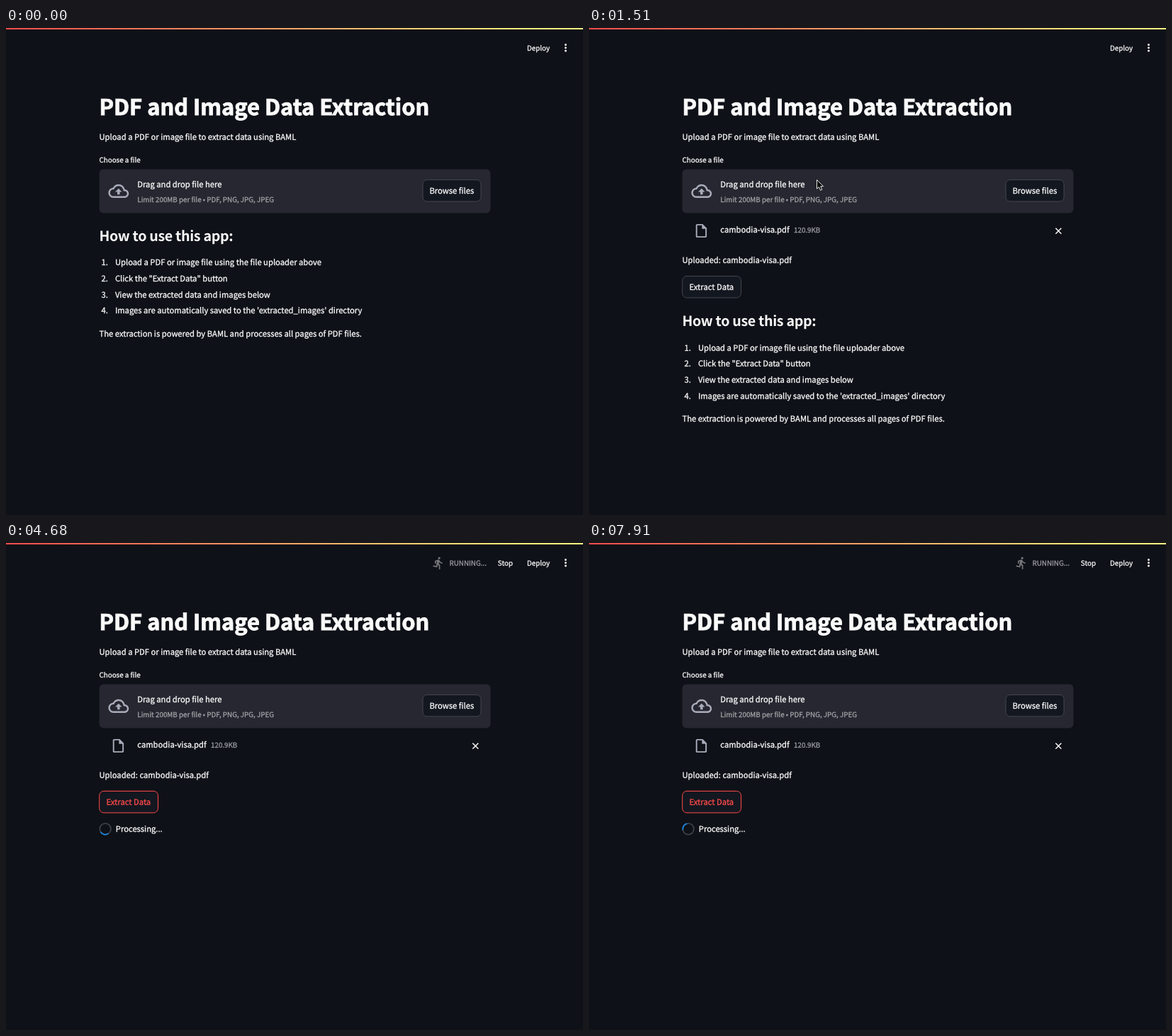
An HTML page with a canvas for the animation above (8000 ms loop, 814 px wide and 688 px high).

```html
<!DOCTYPE html>
<html lang="en">
<head>
<meta charset="utf-8">
<title>PDF and Image Data Extraction</title>
<style>
  html, body { margin: 0; width: 100%; height: 100%; overflow: hidden; background: #0e1117; }
  canvas { display: block; width: 814px; height: 688px; }
</style>
</head>
<body>
<canvas id="stage"></canvas>
<script>
const W = 814, H = 688, LOOP = 8000, START = 630, STEP = 87.74;
const canvas = document.getElementById('stage');
const ctx = canvas.getContext('2d');
const dpr = window.devicePixelRatio || 1;
canvas.width = W * dpr;
canvas.height = H * dpr;

const SANS = '"Noto Sans CJK JP", "Noto Sans CJK SC", "Noto Sans CJK", "Noto Sans", sans-serif';
const BODY = 11.22, SMALL = 9.82;
const WHITE = '#fafafa', GREY = '#9b9da2', RED = '#ff4b4b', BG = '#0e1117';
const FILE = 'cambodia-visa.pdf';

const ICON = {
  cloud: new Path2D('M19.35 10.04C18.67 6.59 15.64 4 12 4 9.11 4 6.6 5.64 5.35 8.04 2.34 8.36 0 10.91 0 14c0 3.31 2.69 6 6 6h13c2.76 0 5-2.24 5-5 0-2.64-2.05-4.78-4.65-4.96zM19 18H6c-2.21 0-4-1.79-4-4 0-2.05 1.53-3.76 3.56-3.97l1.07-.11.5-.95C8.08 7.14 9.94 6 12 6c2.62 0 4.88 1.86 5.39 4.43l.3 1.5 1.53.11c1.56.1 2.78 1.41 2.78 2.96 0 1.65-1.35 3-3 3zM8 13h2.55v3h2.9v-3H16l-4-4z'),
  file: new Path2D('M14 2H6c-1.1 0-2 .9-2 2v16c0 1.1.9 2 2 2h12c1.1 0 2-.9 2-2V8zM6 20V4h7v5h5v11z'),
  stand: new Path2D('M12 2c1.1 0 2 .9 2 2s-.9 2-2 2-2-.9-2-2 .9-2 2-2zm9 7h-6v13h-2v-6h-2v6H9V9H3V7h18z'),
  run: new Path2D('M13.49 5.48c1.1 0 2-.9 2-2s-.9-2-2-2-2 .9-2 2 .9 2 2 2zm-3.6 13.9l1-4.4 2.1 2v6h2v-7.5l-2.1-2 .6-3c1.3 1.5 3.3 2.5 5.5 2.5v-2c-1.9 0-3.5-1-4.3-2.4l-1-1.6c-.4-.6-1-1-1.7-1-.3 0-.5.1-.8.1l-5.2 2.2v4.7h2v-3.4l1.8-.7-1.6 8.1-4.9-1-.4 2z'),
  arrow: new Path2D('M0 0V12.6L2.9 10L5 14.8L7.2 13.8L5.2 9.2H9z'),
  hand: new Path2D('M-1.6 1.2C-1.6-.4 1-.4 1 1.2V5C1.3 4 3.2 4.1 3.4 5.2C3.8 4.5 5.4 4.7 5.6 5.8C6 5.3 7.4 5.5 7.4 6.8V9.3C7.4 11 6.2 11.6 6.2 13.3H-.6C-.8 11.6-2.8 10.4-3.9 8.2C-4.5 6.8-2.9 6-2 7L-1.6 7.6zM.9 8.4V11M2.9 8.4V11M4.9 8.4V11')
};

const lerp = (a, b, p) => a + (b - a) * p;
const clamp = v => Math.min(1, Math.max(0, v));
const smooth = p => p * p * (3 - 2 * p);

function text(str, x, y, { size = BODY, color = WHITE, weight = 400, gap = 0, family = SANS, heft = 0.3 } = {}) {
  ctx.font = `${weight} ${size}px ${family}`;
  ctx.letterSpacing = gap + 'px';
  ctx.fillStyle = ctx.strokeStyle = color;
  ctx.lineWidth = heft;
  ctx.fillText(str, x, y);
  if (heft) ctx.strokeText(str, x, y);
}

function box(x, y, w, h, r, fill, stroke) {
  ctx.beginPath();
  ctx.roundRect(x, y, w, h, r);
  if (fill) { ctx.fillStyle = fill; ctx.fill(); }
  if (stroke) { ctx.strokeStyle = stroke; ctx.lineWidth = 1; ctx.stroke(); }
}

function dot(x, y, r, color) {
  ctx.fillStyle = color;
  ctx.beginPath();
  ctx.arc(x, y, r, 0, 7);
  ctx.fill();
}

function icon(path, x, y, scale, color) {
  ctx.save();
  ctx.translate(x, y);
  ctx.scale(scale, scale);
  ctx.fillStyle = color;
  ctx.fill(path);
  ctx.restore();
}

function pointer(path, x, y) {
  ctx.save();
  ctx.translate(x, y);
  ctx.lineJoin = 'round';
  ctx.lineWidth = 0.9;
  ctx.fillStyle = '#000';
  ctx.strokeStyle = '#fff';
  ctx.fill(path);
  ctx.stroke(path);
  ctx.restore();
}

function header() {
  const g = ctx.createLinearGradient(0, 0, W, 0);
  g.addColorStop(0, '#ff4b4b');
  g.addColorStop(1, '#fffd80');
  ctx.fillStyle = g;
  ctx.fillRect(0, 0, W, 2);
  text('Deploy', 735, 31.7, { size: SMALL });
  for (const y of [23.7, 28, 32.3]) dot(789.5, y, 1.45, WHITE);
}

function uploader() {
  text('PDF and Image Data Extraction', 131.5, 122.8, { size: 30.85, weight: 700, gap: 0.01, heft: 0.9 });
  text('Upload a PDF or image file to extract data using BAML', 131.5, 158.3);
  text('Choose a file', 131.5, 189.7, { size: SMALL });
  box(131.5, 199.5, 552, 62, 6, '#262730');
  icon(ICON.cloud, 144.4, 216, 1.2, '#a9adbb');
  text('Drag and drop file here', 185.3, 225.3);
  text('Limit 200MB per file • PDF, PNG, JPG, JPEG', 185.3, 245.6, { size: SMALL, color: '#a2a3a7' });
  box(588, 214.5, 82, 30.5, 6, '#131720', '#44464e');
  text('Browse files', 597.5, 234.3);
}

function guide(dy) {
  text('How to use this app:', 131.5, 301 + dy, { size: 19.65, weight: 700, gap: -0.33, heft: 0 });
  [
    'Upload a PDF or image file using the file uploader above',
    'Click the "Extract Data" button',
    'View the extracted data and images below',
    "Images are automatically saved to the 'extracted_images' directory"
  ].forEach((line, i) => {
    const y = 335.3 + dy + i * 22.65;
    text(i + 1 + '.', 134.4, y);
    text(line, 153.9, y);
  });
  text('The extraction is powered by BAML and processes all pages of PDF files.', 131.5, 435.6 + dy);
}

function fileRow() {
  icon(ICON.file, 146.9, 275, 0.96, '#a9adbb');
  text(FILE, 185.3, 289.4);
  text('120.9KB', 289, 289.4, { size: SMALL, color: GREY });
  ctx.strokeStyle = WHITE;
  ctx.lineWidth = 1.5;
  ctx.beginPath();
  for (const s of [-1, 1]) {
    ctx.moveTo(662.3 - 4, 286.7 - 4 * s);
    ctx.lineTo(662.3 + 4, 286.7 + 4 * s);
  }
  ctx.stroke();
}

function extractButton(hot) {
  text('Uploaded: ' + FILE, 131.5, 332);
  box(131.7, 350.5, 82.8, 30.6, 6.3, '#131720', hot ? RED : '#44464e');
  text('Extract Data', 141.6, 370.3, { color: hot ? RED : WHITE });
}

function status(tick, t) {
  ctx.globalAlpha = lerp(0.42, 1, clamp((t - 2740) / 350));
  icon(tick % 12 < 6 ? ICON.stand : ICON.run, 600.1, 18.5, 0.82, '#74767a');
  text('RUNNING...', 625.5, 31.7, { size: SMALL, color: GREY });
  text('Stop', 693.8, 31.7, { size: SMALL });
  ctx.globalAlpha = 1;
}

function spinner(t) {
  const mid = (t * 0.3665 - 167.7) * Math.PI / 180;
  const arc = (from, to, color) => {
    ctx.strokeStyle = color;
    ctx.beginPath();
    ctx.arc(140.1, 404, 7.8, from, to);
    ctx.stroke();
  };
  ctx.lineWidth = 1.8;
  arc(0, Math.PI * 2, '#3d4045');
  arc(mid - Math.PI / 4, mid + Math.PI / 4, '#1c83e1');
  text('Processing...', 154.8, 408.4);
}

function dragged(x, y) {
  box(x - 49, y - 10, 9.5, 11.5, 1, '#e8ebf0');
  ctx.fillStyle = '#5f7fa8';
  ctx.fillRect(x - 47, y - 5.5, 5, 4);
  ctx.fillStyle = '#a9b4c4';
  ctx.fillRect(x - 47, y - 8, 4, 1);
  box(x - 37, y - 11, 103, 13, 5, '#7b2f86');
  text(FILE, x - 33, y - 0.8, { size: 10.4, weight: 500, family: 'Inter, sans-serif', color: '#f0e3f3', heft: 0 });
  dot(x + 8.3, y + 19.7, 8, '#1fa40f');
  ctx.fillStyle = '#fff';
  ctx.fillRect(x + 4.1, y + 18.8, 8.4, 1.8);
  ctx.fillRect(x + 7.4, y + 15.5, 1.8, 8.4);
}

function cursorAt(t) {
  if (t < 1420) {
    const p = clamp((t - START) / 600);
    const q = 1 - p;
    return [321.5 + 318 * q ** 2.05, 214.5 - 36 * (1 - p ** 1.55)];
  }
  if (t < 3330) {
    const p = smooth(clamp((t - 1700) / 850));
    return [lerp(321.5, 181, p), lerp(214.5, 371.6, p)];
  }
  const p = smooth(clamp((t - 3330) / 540));
  return [lerp(181, 800, p), lerp(371.6, 472, p)];
}

function cursor(t) {
  if (t < START || t > 3990) return;
  const [x, y] = cursorAt(t);
  if (t < 1420) dragged(x, y);
  const over = y > 350 && y < 381 && x < 214.5;
  pointer(over ? ICON.hand : ICON.arrow, x, y);
}

function draw(now) {
  const time = now % LOOP;
  const tick = Math.floor((time - START + 5) / STEP);
  const t = time < START ? 0 : START + tick * STEP + 1;
  ctx.setTransform(dpr, 0, 0, dpr, 0, 0);
  ctx.textRendering = 'geometricPrecision';
  ctx.fillStyle = BG;
  ctx.fillRect(0, 0, W, H);
  header();
  uploader();
  if (t < 2730) guide(t < 1415 ? 0 : t < 1500 ? 44 : 120.4);
  if (t >= 1415) fileRow();
  if (t >= 1500) extractButton(t > 1700 && cursorAt(t)[1] > 350);
  if (t >= 2730) status(tick, t);
  if (t >= 2900) spinner(t);
  cursor(t);
}

function loop() {
  draw(performance.now());
  requestAnimationFrame(loop);
}
loop();
</script>
</body>
</html>
```
